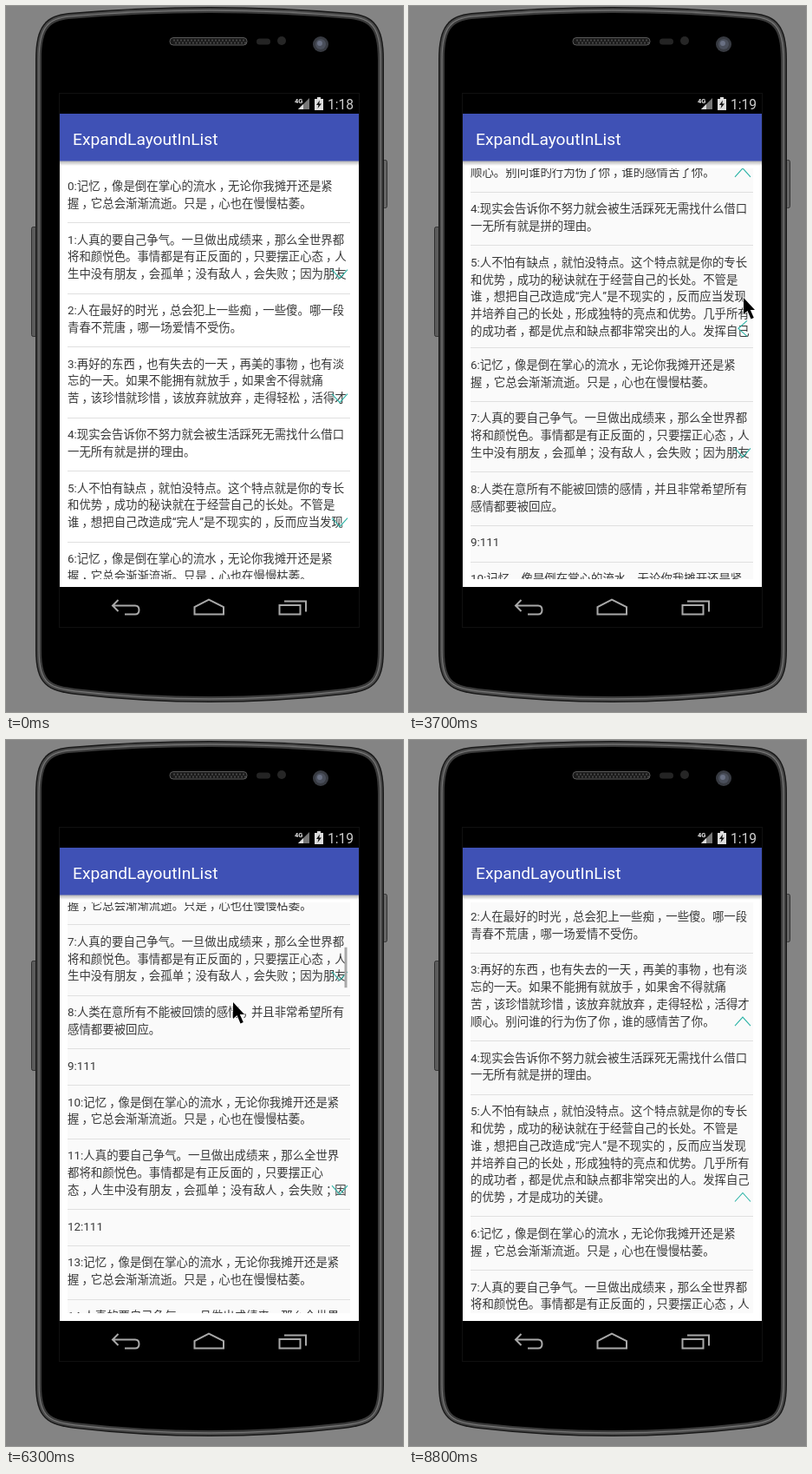
Write an HTML page with a canvas that moves like this. It is 458x813 px and loops after 9100 ms.

```html
<!DOCTYPE html>
<html lang="zh">
<head>
<meta charset="utf-8">
<title>ExpandLayoutInList</title>
<style>
html, body { margin: 0; width: 100%; height: 100%; overflow: hidden; background: #848484; }
canvas { display: block; width: 458px; height: 813px; }
</style>
</head>
<body>
<canvas id="stage"></canvas>
<script>
const W = 458, H = 813, LOOP = 9100, STEP = 100;
const SANS = 'Roboto, "Noto Sans CJK SC", "Noto Sans CJK", sans-serif';
const LINE = 19.8, PAD = 22, LEFT = 71, RIGHT = 397, TOP = 187, BOTTOM = 660;

const canvas = document.getElementById('stage');
const dpr = window.devicePixelRatio || 1;
canvas.width = W * dpr;
canvas.height = H * dpr;
const ctx = canvas.getContext('2d');

// List content; "/" marks a line break
const memory = '记忆，像是倒在掌心的流水，无论你我摊开还是紧/握，它总会渐渐流逝。只是，心也在慢慢枯萎。';
const pride = '人真的要自己争气。一旦做出成绩来，那么全世界都/将和颜悦色。事情都是有正反面的，只要摆正心态，人/生中没有朋友，会孤单；没有敌人，会失败；因为朋友';
const prideWide = '人真的要自己争气。一旦做出成绩来，那么全世界/都将和颜悦色。事情都是有正反面的，只要摆正心/态，人生中没有朋友，会孤单；没有敌人，会失败；因';
const texts = [
  memory,
  pride,
  '人在最好的时光，总会犯上一些痴，一些傻。哪一段/青春不荒唐，哪一场爱情不受伤。',
  '再好的东西，也有失去的一天，再美的事物，也有淡/忘的一天。如果不能拥有就放手，如果舍不得就痛/苦，该珍惜就珍惜，该放弃就放弃，走得轻松，活得才/顺心。别问谁的行为伤了你，谁的感情苦了你。',
  '现实会告诉你不努力就会被生活踩死无需找什么借口/一无所有就是拼的理由。',
  '人不怕有缺点，就怕没特点。这个特点就是你的专长/和优势，成功的秘诀就在于经营自己的长处。不管是/谁，想把自己改造成“完人”是不现实的，反而应当发现/并培养自己的长处，形成独特的亮点和优势。几乎所有/的成功者，都是优点和缺点都非常突出的人。发挥自己/的优势，才是成功的关键。',
  memory,
  pride,
  '人类在意所有不能被回馈的感情，并且非常希望所有/感情都要被回应。',
  '111', memory, prideWide, '111', memory, prideWide, '111', memory
];
const items = texts.map((text, i) => (i + ':' + text).split('/'));

// Keyframes: [time, value, ...]
const scrollKeys = [[500, 0], [700, 22], [1000, 60], [1300, 82], [2300, 82], [2400, 122], [2500, 164.8],
  [2700, 245], [3000, 279.6], [5600, 279.6], [6000, 430], [6300, 545], [6600, 645], [6800, 655],
  [7000, 655], [7300, 621], [7600, 490], [8000, 260], [8300, 147.3]];
const cursorKeys = [[300, 417, 520], [500, 352, 455], [1300, 350, 373], [1400, 350, 373], [1600, 384, 370],
  [1900, 384, 370], [2200, 315, 484], [2300, 315, 484], [2500, 295, 402], [2800, 290, 310],
  [3200, 387, 333], [3300, 387, 333], [3400, 386, 336], [3800, 386, 336], [4100, 383, 374],
  [4300, 383, 374], [4600, 386, 389], [4900, 386, 389], [5200, 386, 336], [5500, 386, 336],
  [5700, 290, 480], [6300, 262, 302], [6500, 264, 272], [7000, 295, 440], [7300, 297, 474],
  [7700, 312, 600], [8400, 314, 520]];
const barKeys = [[400, 0], [500, 1], [1600, 1], [1900, 0], [2300, 0], [2400, 1], [3000, 1], [3300, 0],
  [5500, 0], [5600, 1], [8600, 1], [8800, 0]];
const openKeys = {
  3: [[1700, 0], [1900, 1]],
  5: [[3600, 0], [3800, 1], [4700, 1], [4900, 0], [5200, 0], [5400, 1]]
};

function at(keys, t, k = 1) {
  if (t <= keys[0][0]) return keys[0][k];
  for (let i = 1; i < keys.length; i++) {
    const a = keys[i - 1], b = keys[i];
    if (t < b[0]) return a[k] + (b[k] - a[k]) * (t - a[0]) / (b[0] - a[0]);
  }
  return keys[keys.length - 1][k];
}

function rect(x, y, w, h, color) {
  ctx.fillStyle = color;
  ctx.fillRect(x, y, w, h);
}

function pill(x, y, w, h, r, fill, stroke) {
  ctx.beginPath();
  ctx.roundRect(x, y, w, h, r);
  ctx.fillStyle = fill;
  ctx.fill();
  if (stroke) { ctx.strokeStyle = stroke; ctx.lineWidth = 1; ctx.stroke(); }
}

function disc(x, y, r, color) {
  ctx.beginPath();
  ctx.arc(x, y, r, 0, Math.PI * 2);
  ctx.fillStyle = color;
  ctx.fill();
}

function label(text, x, y, size, color, weight = 400) {
  ctx.font = `${weight} ${size}px ${SANS}`;
  ctx.fillStyle = color;
  ctx.fillText(text, x, y);
}

function line(path, color, width) {
  ctx.strokeStyle = color;
  ctx.lineWidth = width;
  ctx.stroke(new Path2D(path));
}

function body(i, fill) {
  const l = 34 + i, r = 436 - i;
  ctx.fillStyle = fill;
  ctx.fill(new Path2D(`M${l},62 C${l},22 ${l + 12},${11 + i} 72,${8 + i}
    Q235,${-6 + i} 398,${8 + i} C${r - 12},${11 + i} ${r},22 ${r},62
    V742 C${r},782 ${r - 14},${789 - i} 390,${793 - i}
    Q235,${811 - i} 80,${793 - i} C${l + 14},${789 - i} ${l},782 ${l},742 Z`));
}

function drawPhone() {
  rect(0, 0, W, H, '#848484');
  pill(29.5, 254.5, 6, 126, 2, '#5c5c5c', '#303030');
  pill(434.5, 177.5, 5, 55, 2, '#666', '#303030');
  body(0, '#191919');
  body(1.5, '#4a4a4a');
  body(3.5, '#767676');
  body(4.7, '#3a3a3a');
  body(7, '#000');

  pill(189, 36.5, 89, 8.5, 4, '#1a1a1a', '#5a5a5a');
  for (let x = 193; x < 276; x += 4) {
    rect(x, 38.5, 2, 2, '#454545');
    rect(x + 2, 41.5, 2, 2, '#454545');
  }
  pill(289, 37.5, 16, 7, 3.5, '#242424');
  disc(318, 40, 5, '#262626');
  disc(363, 44, 9, '#373a41');
  disc(363, 44, 6, '#4a4f5b');
  disc(362, 43, 3, '#697083');

  ctx.strokeStyle = '#101010';
  ctx.lineWidth = 1;
  ctx.strokeRect(61.5, 100.5, 346, 615);
}

function drawBars(t) {
  label('4G', 333, 112, 7.5, '#e8e8e8', 700);
  ctx.fillStyle = '#777';
  ctx.fill(new Path2D('M350,106 V119 H337 Z'));
  ctx.fillStyle = '#ddd';
  ctx.fill(new Path2D('M343,113 V119 H337 Z'));
  ctx.fillStyle = '#ddd';
  ctx.fill(new Path2D('M356,107 H359 V105 H363 V107 H366 V120 H356 Z'));
  ctx.fillStyle = '#111';
  ctx.fill(new Path2D('M362,108.5 L358,114 H360.5 L359.5,118 L364,112.5 H361.3 Z'));
  label(t < 1800 ? '1:18' : '1:19', 371, 118.5, 15.6, '#cfcfcf');

  line('M129.5,684 L123,690.5 L129.5,697 M123,690.5 H149 Q153.5,690.5 153.5,695.5 T149,700.5 H137', '#a9a9a9', 2);
  line('M217.5,700.5 V692 L234,683.5 L251,692 V700.5 Z', '#a9a9a9', 2);
  line('M315.5,690 H339.5 V700.5 H315.5 Z M321,685.5 H346 V697.5', '#a9a9a9', 2);
}

function drawHeader() {
  const shade = ctx.createLinearGradient(0, 178, 0, 184);
  shade.addColorStop(0, 'rgba(0,0,0,.32)');
  shade.addColorStop(1, 'rgba(0,0,0,0)');
  rect(62, 178, 345, 6, shade);
  rect(62, 124, 345, 54.5, '#3f51b5');
  label('ExpandLayoutInList', 77, 159.5, 19.2, '#fff');
}

// Wide commas sit nearer the middle of their cell
function drawLine(text, y) {
  let x = LEFT;
  for (const ch of text) {
    ctx.fillText(ch, x + ('，；'.includes(ch) ? 3 : 0), y);
    x += ctx.measureText(ch).width;
  }
}

function chevron(y, turn) {
  ctx.save();
  ctx.translate(385, y);
  ctx.rotate(Math.PI * turn);
  line('M-9,-5 L0,5 L9,-5', '#2bb3a6', 1.1);
  ctx.restore();
}

function drawItem(lines, y, textHeight, open) {
  ctx.save();
  ctx.beginPath();
  ctx.rect(LEFT - 1, y + 9, RIGHT - LEFT + 2, textHeight + 1);
  ctx.clip();
  ctx.font = `13.42px ${SANS}`;
  ctx.fillStyle = '#383838';
  lines.forEach((text, k) => drawLine(text, y + 24 + k * LINE));
  ctx.restore();
  if (lines.length > 2) chevron(y + textHeight - 0.4, open);
}

function drawList(t) {
  rect(62, 178, 345, 491, '#fff');
  if (t >= 300) rect(LEFT, TOP, RIGHT - LEFT, BOTTOM - TOP, '#fafafa');
  ctx.save();
  ctx.beginPath();
  ctx.rect(62, TOP, 345, BOTTOM - TOP);
  ctx.clip();

  const scroll = at(scrollKeys, t);
  let y = 188 - scroll, shown = 0;
  items.forEach((lines, i) => {
    const open = openKeys[i] ? at(openKeys[i], t) : 0;
    const base = Math.min(lines.length, 3);
    const textHeight = LINE * (base + (lines.length - base) * open ** 0.7);
    const height = PAD + textHeight;
    if (y < BOTTOM && y + height > TOP) {
      shown += (Math.min(y + height, BOTTOM) - Math.max(y, TOP)) / height;
      if (i) rect(LEFT, Math.floor(y), RIGHT - LEFT, 1, '#e0e0e0');
      drawItem(lines, y, textHeight, open);
    }
    y += height;
  });

  ctx.globalAlpha = at(barKeys, t);
  rect(390.5, 193.5 + 0.083 * scroll, 3, 6.1 * shown, '#a8a8a8');
  ctx.restore();
}

function drawCursor(t) {
  if (t < 300 || t >= 8500) return;
  ctx.save();
  ctx.translate(at(cursorKeys, t, 1), at(cursorKeys, t, 2));
  const arrow = new Path2D('M0,0 V19 L4.5,15 L8.5,24.5 L11.8,23 L7.8,14 H13 Z');
  ctx.strokeStyle = '#fff';
  ctx.lineWidth = 1.2;
  ctx.stroke(arrow);
  ctx.fillStyle = '#000';
  ctx.fill(arrow);
  ctx.restore();
}

function render(now) {
  const t = Math.floor((now % LOOP) / STEP) * STEP;
  ctx.setTransform(dpr, 0, 0, dpr, 0, 0);
  drawPhone();
  drawBars(t);
  drawList(t);
  drawHeader();
  drawCursor(t);
}

const start = performance.now();
function tick() {
  render(performance.now() - start);
  requestAnimationFrame(tick);
}
tick();
</script>
</body>
</html>
```
